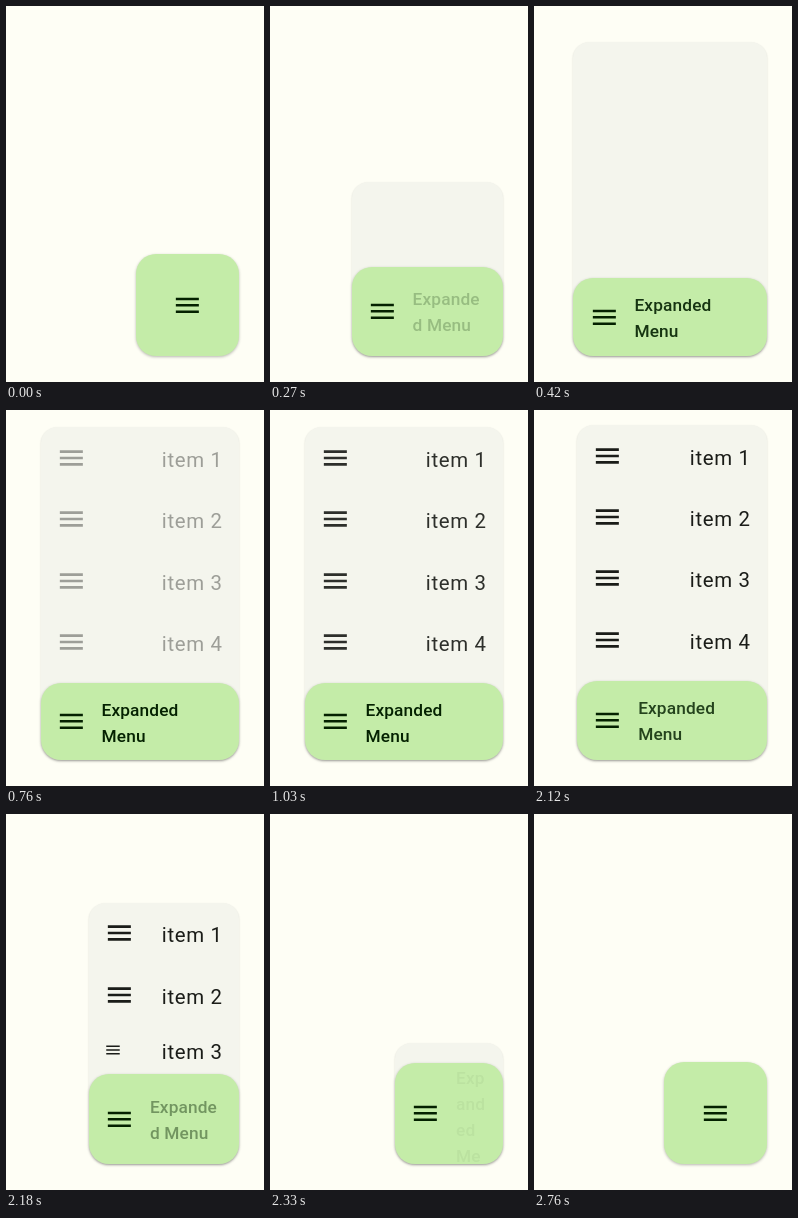
Write an HTML page that moves like this. It is 258 px wide and 376 px high and loops after 2970 ms.

```html
<!DOCTYPE html>
<html lang="en">
<head>
<meta charset="utf-8">
<title>Expanding menu</title>
<style>
  html, body { margin: 0; width: 100%; height: 100%; overflow: hidden; background: #fefef5; }
  #stage { position: relative; width: 258px; height: 376px; overflow: hidden; font-family: Roboto, sans-serif; }
  #menu, #fab { position: absolute; border-radius: 20px; }
  #menu { right: 25.5px; bottom: 26px; }
  #menu.open { background: #f4f5ed; border-radius: 16px 16px 20px 20px; box-shadow: 0 1px 2px rgba(0, 0, 0, .16); }
  #list { position: absolute; inset: 0; overflow: hidden; border-radius: inherit; color: #1a1c18; }
  .row { position: absolute; left: 0; right: 0; overflow: hidden; }
  .row svg { position: absolute; left: 15.3px; top: 50%; transform: translateY(-50%); }
  .row span { position: absolute; right: 16px; top: 50%; font-size: 20.4px; line-height: 32px; letter-spacing: .64px; white-space: nowrap; transform: translateY(calc(-50% + 1.7px)); }
  #fab { left: 0; right: 0; bottom: 0; overflow: hidden; background: #c4eca8; color: #042100; box-shadow: 0 1px 3px rgba(0, 0, 0, .28); }
  #fab svg { position: absolute; top: 50%; width: 30.7px; height: 30.7px; margin-top: -15.2px; }
  #label { position: absolute; left: 61px; top: 2px; bottom: 0; display: flex; align-items: center; }
  #label span { max-height: 100%; overflow: hidden; font-size: 17.3px; font-weight: 500; line-height: 26px; letter-spacing: .13px; overflow-wrap: anywhere; width: 100%; }
  svg { fill: currentColor; display: block; }
</style>
</head>
<body>
<div id="stage">
  <div id="menu">
    <div id="list"></div>
    <div id="fab"><div id="label"><span>Expanded Menu</span></div></div>
  </div>
</div>
<script>
const LOOP = 2970;
const ROW = 61.4, ICON = 30.7, PAD = 30.7, PANEL = 256;
const OPEN = 186, CLOSE = 2096, LAG = 26;
const LABEL_IN = 120, LABEL_OUT = 2600;

const $ = id => document.getElementById(id);
const [menu, list, fab, label] = ['menu', 'list', 'fab', 'label'].map($);
const bars = '<svg viewBox="0 0 24 24"><path d="M3 18h18v-2H3zM3 13h18v-2H3zM3 8h18V6H3z"/></svg>';

fab.insertAdjacentHTML('afterbegin', bars);
const fabIcon = fab.firstElementChild;
const rows = [1, 2, 3, 4].map(n => {
  const el = document.createElement('div');
  el.className = 'row';
  el.innerHTML = `${bars}<span>item ${n}</span>`;
  list.append(el);
  return { el, icon: el.firstElementChild };
});

const clamp = (v, lo, hi) => Math.min(hi, Math.max(lo, v));

// Critically damped spring, stiffness 400: distance still to go after ms
function rest(ms) {
  const x = Math.max(0, ms) * 0.02;
  const r = (1 + x) * Math.exp(-x);
  return r < 0.002 ? 0 : r;
}

const spring = (t, start, end) => t < end ? 1 - rest(t - start) : rest(t - end);

// cubic-bezier(.4, 0, .2, 1)
function ease(x) {
  let lo = 0, hi = 1;
  for (let i = 0; i < 20; i++) {
    const s = (lo + hi) / 2, r = 1 - s;
    if (1.2 * r * r * s + 0.6 * r * s * s + s * s * s < x) lo = s; else hi = s;
  }
  return lo * lo * (3 - 2 * lo);
}

function render(t) {
  const grow = spring(t, OPEN, CLOSE);
  const reveal = spring(t, OPEN + LAG, CLOSE + LAG);
  const width = 102.5 + 95.5 * grow;
  const fabHeight = 102.4 - 25.7 * grow;
  const panel = PANEL * reveal;

  menu.style.width = width + 'px';
  menu.style.height = fabHeight + panel + 'px';
  menu.classList.toggle('open', panel > 0.5);
  fab.style.height = fabHeight + 'px';

  const labelled = t >= LABEL_IN && t < LABEL_OUT;
  fabIcon.style.left = (labelled ? 15.3 : (width - ICON) / 2) + 'px';
  label.style.width = width - 77 + 'px';
  label.style.opacity = labelled ? spring(t, OPEN + 40, CLOSE - 12) : 0;

  list.style.opacity = ease(clamp((t - OPEN - LAG - 300) / 800, 0, 1));
  rows.forEach(({ el, icon }, i) => {
    const h = clamp(panel - i * ROW, 0, ROW);
    const size = clamp(h - PAD, 0, ICON);
    el.style.top = i * ROW + 'px';
    el.style.height = h + 'px';
    el.style.visibility = size > 2 ? 'visible' : 'hidden';
    icon.style.width = icon.style.height = size + 'px';
  });
}

const begin = performance.now();
function tick() {
  render((performance.now() - begin) % LOOP);
  requestAnimationFrame(tick);
}
tick();
</script>
</body>
</html>
```
